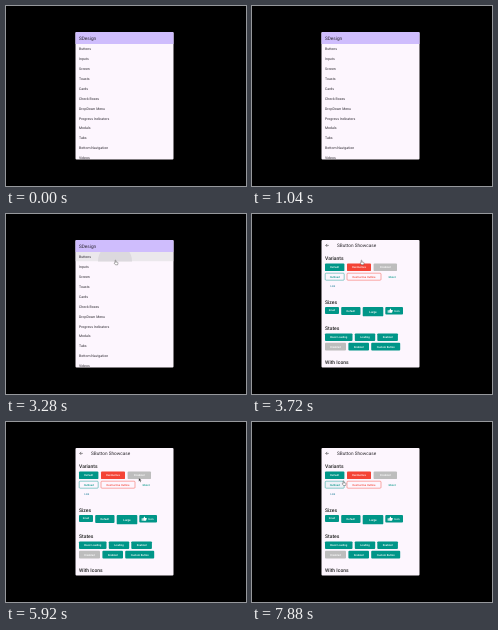
Animation of 240x180 px, one loop 8000 ms. Source, as an HTML page:

```html
<!DOCTYPE html>
<html lang="en">
<head>
<meta charset="utf-8">
<title>Component showcase</title>
<style>
  html, body { margin: 0; width: 100%; height: 100%; overflow: hidden; background: #000; }
  svg { display: block; width: 240px; height: 180px; }
  text { font-family: Roboto, sans-serif; text-rendering: geometricPrecision; }
</style>
</head>
<body>
<svg id="stage" viewBox="0 0 240 180">
  <defs>
    <clipPath id="panel"><rect x="69.5" y="26" width="98" height="127.6" rx="1"/></clipPath>
    <clipPath id="row"><rect x="69.5" y="38" width="98" height="9.5"/></clipPath>
  </defs>
  <rect width="240" height="180" fill="#000"/>
  <g clip-path="url(#panel)">
    <rect x="69" y="26" width="99" height="128" fill="#fdf6fe"/>
    <g id="list"></g>
    <g id="page"></g>
    <g id="cursor">
      <path id="hand" d="M1.1 .4Q1.6 0 1.9 .5V2L3.7 2.4Q4.1 2.6 4 3.2L3.6 4.8H1.5L.2 3.2Q.3 2.6 1.1 3Z"
        fill="#fff" stroke="#333" stroke-width=".4"/>
      <path id="arrow" d="M.3 .2V4L1.2 3.2L1.9 4.7L2.5 4.4L1.9 3H3.1Z"
        fill="#222" stroke="#fff" stroke-width=".3"/>
    </g>
  </g>
</svg>
<script>
const NS = 'http://www.w3.org/2000/svg';
const LOOP = 8000, STEP = 40;
const TEAL = '#009688', RED = '#f44336', GREY = '#bdbdbd';
const $ = id => document.getElementById(id);
const list = $('list'), page = $('page');

function add(parent, tag, attrs, label) {
  const el = document.createElementNS(NS, tag);
  for (const k in attrs) el.setAttribute(k, attrs[k]);
  if (label) el.textContent = label;
  parent.appendChild(el);
  return el;
}

function text(parent, label, x, y, size, fill, extra) {
  return add(parent, 'text', { x, y, 'font-size': size, fill, ...extra }, label);
}

function button(label, x, y, w, h, kind, color = TEAL, size = 2.7) {
  const solid = kind === 'solid';
  add(page, 'rect', {
    x, y, width: w, height: h, rx: 0.9,
    fill: solid ? color : 'none',
    stroke: kind === 'outline' ? color : 'none', 'stroke-width': 0.45
  });
  const glow = add(page, 'rect', {
    x, y, width: w, height: h, rx: 0.9, fill: solid ? '#fff' : color, opacity: 0
  });
  text(page, label, x + w / 2, y + h / 2 + size * 0.36, size, solid ? '#fff' : color,
    { 'text-anchor': 'middle', 'font-weight': 500 });
  return glow;
}

// list screen
add(list, 'rect', { x: 69, y: 26, width: 99, height: 12, fill: '#cfbdfd' });
text(list, 'SDesign', 73, 33.5, 4.7, '#29232f');
const press = add(list, 'g', { 'clip-path': 'url(#row)' });
add(press, 'rect', { x: 69, y: 38, width: 99, height: 9.5, fill: '#ebe8ec' });
add(press, 'circle', { cx: 109, cy: 47, r: 17, fill: '#dcd9de' });
['Buttons', 'Inputs', 'Screen', 'Toasts', 'Cards', 'Check Boxes', 'DropDown Menu',
 'Progress Indicators', 'Modals', 'Tabs', 'Bottom Navigation', 'Videos'
].forEach((s, i) => text(list, s, 73, 44.1 + i * 9.92, 3.5, '#2d2931'));

// button screen
add(page, 'path', {
  d: 'M76.8 31.4H73.8M75.2 29.9L73.7 31.4L75.2 32.9',
  fill: 'none', stroke: '#222', 'stroke-width': 0.5
});
text(page, 'SButton Showcase', 85, 33, 4.7, '#29262c');
[['Variants', 46], ['Sizes', 89.6], ['States', 115.8], ['With Icons', 150.2]]
  .forEach(([s, y]) => text(page, s, 73, y, 5, '#222', { 'font-weight': 500 }));

button('Default', 73, 49.5, 19.4, 7.6, 'solid');
const redGlow = button('Destructive', 95, 49.5, 24, 7.6, 'solid', RED);
button('Disabled', 121.6, 49.5, 23.4, 7.6, 'solid', GREY);
const lineGlow = button('Outlined', 73.2, 59.2, 19, 7, 'outline');
const redLineGlow = button('Destructive Outline', 95, 59.2, 34, 7, 'outline', RED);
const ghostGlow = button('Ghost', 131, 59.2, 18, 7, 'ghost');
button('Link', 73, 68.7, 15.5, 7, 'ghost', '#3d8fa8');

button('Small', 73, 93, 14, 7, 'solid', TEAL, 2.5);
button('Default', 89.2, 93, 19.3, 8, 'solid');
button('Large', 110.7, 93, 20.6, 9.3, 'solid', TEAL, 2.9);
button('', 133.3, 93, 17.7, 7.4, 'solid');
add(page, 'path', {
  d: 'M135.7 96.3H136.7V98.8H135.7ZM137.2 96.3L138.7 94.4L139.2 94.9L138.9 96H140.8L140.3 98.2L139.6 98.8H137.2Z',
  fill: '#fff'
});
text(page, 'Icon', 142.3, 97.7, 2.7, '#fff', { 'font-weight': 500 });

button('Basic Loading', 73, 119.4, 27.5, 7.6, 'solid');
button('Loading', 102.8, 119.4, 20.4, 7.6, 'solid');
button('Enabled', 125.3, 119.4, 20.6, 7.6, 'solid');
button('Disabled', 73, 128.8, 21, 7.6, 'solid', GREY);
button('Enabled', 96.4, 128.8, 20.6, 7.6, 'solid');
button('Custom Button', 119.2, 128.8, 29, 7.6, 'solid');

// pointer stops: time, x, y
const path = [
  [1600, 169, 61], [2000, 136, 60], [2440, 113, 54], [3040, 108, 46], [4160, 108, 46],
  [4600, 107.5, 52.3], [4840, 107.5, 52.3], [5160, 113, 60], [5320, 113, 60],
  [5920, 132.5, 55.5], [6160, 136, 58.5], [6360, 142, 59], [6480, 142, 59],
  [6720, 115.5, 62.5], [6840, 115.5, 62.5], [6920, 111.7, 63],
  [7120, 111.7, 63], [7560, 90, 58.7], [8000, 90, 58.7]
];

function pointer(t) {
  const i = path.findIndex(p => p[0] > t);
  if (i < 1) return path[0].slice(1);
  const [t0, x0, y0] = path[i - 1], [t1, x1, y1] = path[i];
  let k = (t - t0) / (t1 - t0);
  k = k * k * (3 - 2 * k);
  return [x0 + (x1 - x0) * k, y0 + (y1 - y0) * k];
}

const clamp = v => Math.max(0, Math.min(1, v));
const hover = (t, on, off, max) =>
  max * Math.min(clamp((t - on) / 120), clamp((off - t) / 120));
const show = (el, on) => el.setAttribute('display', on ? 'inline' : 'none');

function draw(t) {
  const onPage = t >= 3720;
  show(list, !onPage);
  show(page, onPage);
  show(press, t >= 3280 && !onPage);

  const [x, y] = pointer(t);
  const useArrow = (t >= 3920 && t < 4320) || (t >= 5440 && t < 6200);
  show($('cursor'), t >= 1640);
  show($('hand'), !useArrow);
  show($('arrow'), useArrow);
  $('cursor').setAttribute('transform', `translate(${x} ${y})`);

  redGlow.setAttribute('opacity', hover(t, 4320, 5120, 0.1));
  redLineGlow.setAttribute('opacity', hover(t, 6600, 7400, 0.05));
  ghostGlow.setAttribute('opacity', hover(t, 6480, 6920, 0.16));
  lineGlow.setAttribute('opacity', hover(t, 7480, 9000, 0.06));
}

function tick() {
  const t = performance.now() % LOOP;
  draw(Math.floor(t / STEP) * STEP);
  requestAnimationFrame(tick);
}
tick();
</script>
</body>
</html>
```
